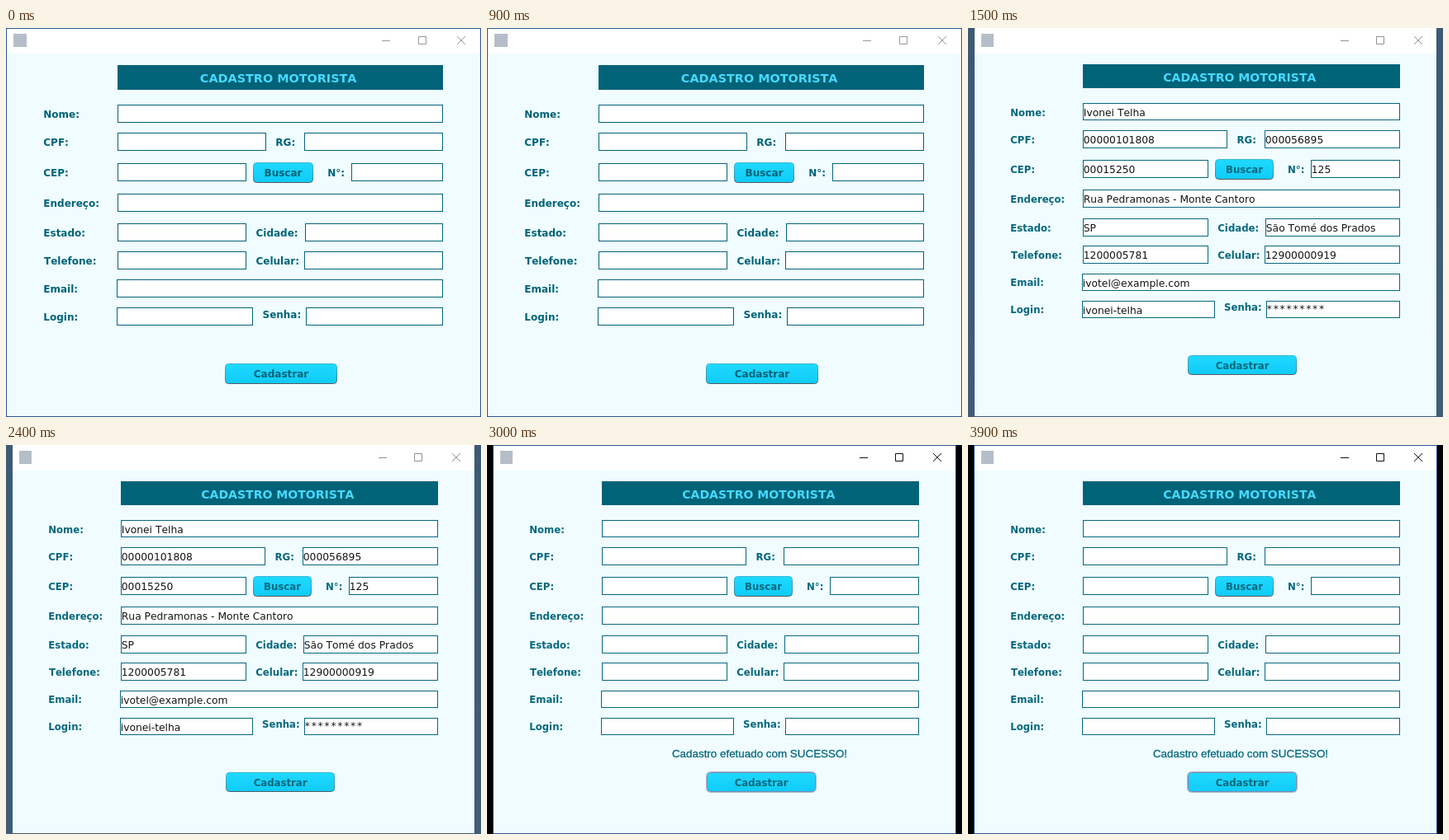
An HTML page that plays this animation: 575x472 px, repeating every 4500 ms.

```html
<!DOCTYPE html>
<html lang="pt-BR">
<head>
<meta charset="utf-8">
<title>Cadastro</title>
<style>
html, body { margin: 0; width: 100%; height: 100%; overflow: hidden; background: #f0fcff; }
svg { display: block; width: 575px; height: 472px; }
text { font-family: "DejaVu Sans", Verdana, sans-serif; font-kerning: none; white-space: pre; }
.note { font-family: "Liberation Sans", Arial, sans-serif; }
</style>
</head>
<body>
<svg id="stage" viewBox="0 0 575 472" xmlns="http://www.w3.org/2000/svg"></svg>
<script>
const stage = document.getElementById('stage');
const LOOP = 4500, STEP = 1500;
const TEAL = '#006378', BLUE = '#2b5797';

// label, label x, baseline, field left, top, right, typed value
const fields = [
  ['Nome:', 45.3, 109, 135, 93, 529, 'Ivonei Telha'],
  ['CPF:', 45.3, 143, 135, 127, 315, '00000101808'],
  ['RG:', 326.3, 143, 361, 127, 529, '000056895'],
  ['CEP:', 45.3, 180, 135, 164, 291, '00015250'],
  ['N°:', 389.3, 180, 418, 164, 529, '125'],
  ['Endereço:', 45.3, 217, 135, 201, 529, 'Rua Pedramonas - Monte Cantoro'],
  ['Estado:', 45.3, 253, 135, 237, 291, 'SP'],
  ['Cidade:', 302.5, 253, 362, 237, 529, 'São Tomé dos Prados'],
  ['Telefone:', 46, 287, 135, 271, 291, '1200005781'],
  ['Celular:', 302.5, 287, 361, 271, 529, '12900000919'],
  ['Email:', 45.3, 321, 134, 305, 529, 'ivotel@example.com'],
  ['Login:', 45.3, 355, 134, 339, 299, 'ivonei-telha'],
  ['Senha:', 310.5, 352, 363, 339, 529, '*********']
];

const small = { k: .976, ky: .9747, dx: 7.05, dy: .3, left: 8, right: 567, ink: '#07687d' };
const scenes = [
  { k: 1, ky: 1, dx: 0, dy: 0, left: 1, right: 574, top: 1, ink: TEAL, desk: BLUE, icons: '#999' },
  { ...small, top: 0, desk: 'url(#desk)', icons: '#929292', filled: true },
  { ...small, top: 1, desk: '#000', icons: '#111', done: true }
];

const rect = (x, y, x2, y2, attrs) =>
  `<rect x="${x}" y="${y}" width="${x2 - x}" height="${y2 - y}" ${attrs}/>`;
const text = (s, x, y, size, fill, attrs = '') =>
  `<text x="${x}" y="${y}" font-size="${size}" fill="${fill}" ${attrs}>${s}</text>`;

function render(s) {
  const X = x => x * s.k + s.dx, Y = y => y * s.ky + s.dy;
  const rx = x => Math.round(X(x)), ry = y => Math.round(Y(y));
  const bold = (str, x, y, size, fill, attrs = '') =>
    text(str, X(x), Y(y), size * s.k, fill, 'font-weight="bold" ' + attrs);
  const mid = 'text-anchor="middle"';

  const button = (str, x, y, x2, y2, active) => {
    const l = rx(x), t = ry(y), r = rx(x2), b = ry(y2);
    return rect(l + .5, t + .5, r - .5, b - .5, `rx="4" fill="url(#btn)" stroke="${active ? '#8188b5' : 'url(#edge)'}"`) +
      (active ? rect(l - .5, t - .5, r + .5, b + .5, 'rx="5" fill="none" stroke="#76869c" stroke-opacity=".55"') : '') +
      bold(str, (x + x2) / 2, y + 17, 12, s.ink, mid);
  };

  let out = `<defs>
    <linearGradient id="btn" x2="0" y2="1"><stop stop-color="#1fd9ff"/><stop offset="1" stop-color="#0fcbf7"/></linearGradient>
    <linearGradient id="edge" x2="0" y2="1"><stop stop-color="#3bb7d6"/><stop offset=".7" stop-color="#3993a9"/><stop offset="1" stop-color="#555b60"/></linearGradient>
    <linearGradient id="desk" x2="0" y2="1"><stop stop-color="#3d5a75"/><stop offset="1" stop-color="#405c76"/></linearGradient>
  </defs>`;

  // window
  out += rect(0, 0, 575, 472, `fill="${s.desk}"`);
  if (s.top) out += rect(s.left - 1, 0, s.right + 1, 472, `fill="${BLUE}"`);
  out += rect(s.left, s.top, s.right, 471, 'fill="#f0fcff"');
  out += rect(s.left, s.top, s.right, ry(31), 'fill="#fff"');
  out += rect(rx(9), ry(7), rx(25), ry(23), 'fill="#b5bec8"');

  // window controls
  const iy = ry(15), ix = rx(455), mx = rx(500), my = ry(10), cx = rx(546);
  out += `<path d="M${ix} ${iy + .5}h10M${mx - .5} ${my + .5}h9v9h-9z
    M${cx} ${my}l10 10M${cx + 10} ${my}l-10 10" fill="none" stroke="${s.icons}"/>`;

  // heading
  out += rect(rx(135), ry(45), rx(529), ry(75), `fill="${TEAL}"`);
  out += bold('CADASTRO MOTORISTA', 329.7, 66, 14.4, '#48d9ff', mid);

  for (const [label, lx, base, x, y, x2, value] of fields) {
    const l = rx(x), t = ry(y);
    out += bold(label, lx, base, 12, s.ink);
    out += rect(l + .5, t + .5, rx(x2) - .5, ry(y + 22) - .5, `fill="#fff" stroke="${s.ink}"`);
    if (s.filled) {
      const mask = value[0] === '*' ? 'letter-spacing="1.75" dy="-2.5"' : '';
      out += text(value, l + .8, t + 16, 12.3, '#151515', mask);
    }
  }

  out += button('Buscar', 299, 163, 372, 188);
  out += button('Cadastrar', 265, 407, 401, 432, s.done);
  if (s.done) {
    out += text('Cadastro efetuado com SUCESSO!', 330, 378.5, 13.4, s.ink,
      `${mid} class="note" stroke="${s.ink}" stroke-width=".3"`);
  }
  stage.innerHTML = out;
}

let shown = -1;
const start = performance.now();
function tick() {
  const t = (performance.now() - start) % LOOP;
  const i = Math.floor(t / STEP);
  if (i !== shown) render(scenes[shown = i]);
  requestAnimationFrame(tick);
}
tick();
</script>
</body>
</html>
```
